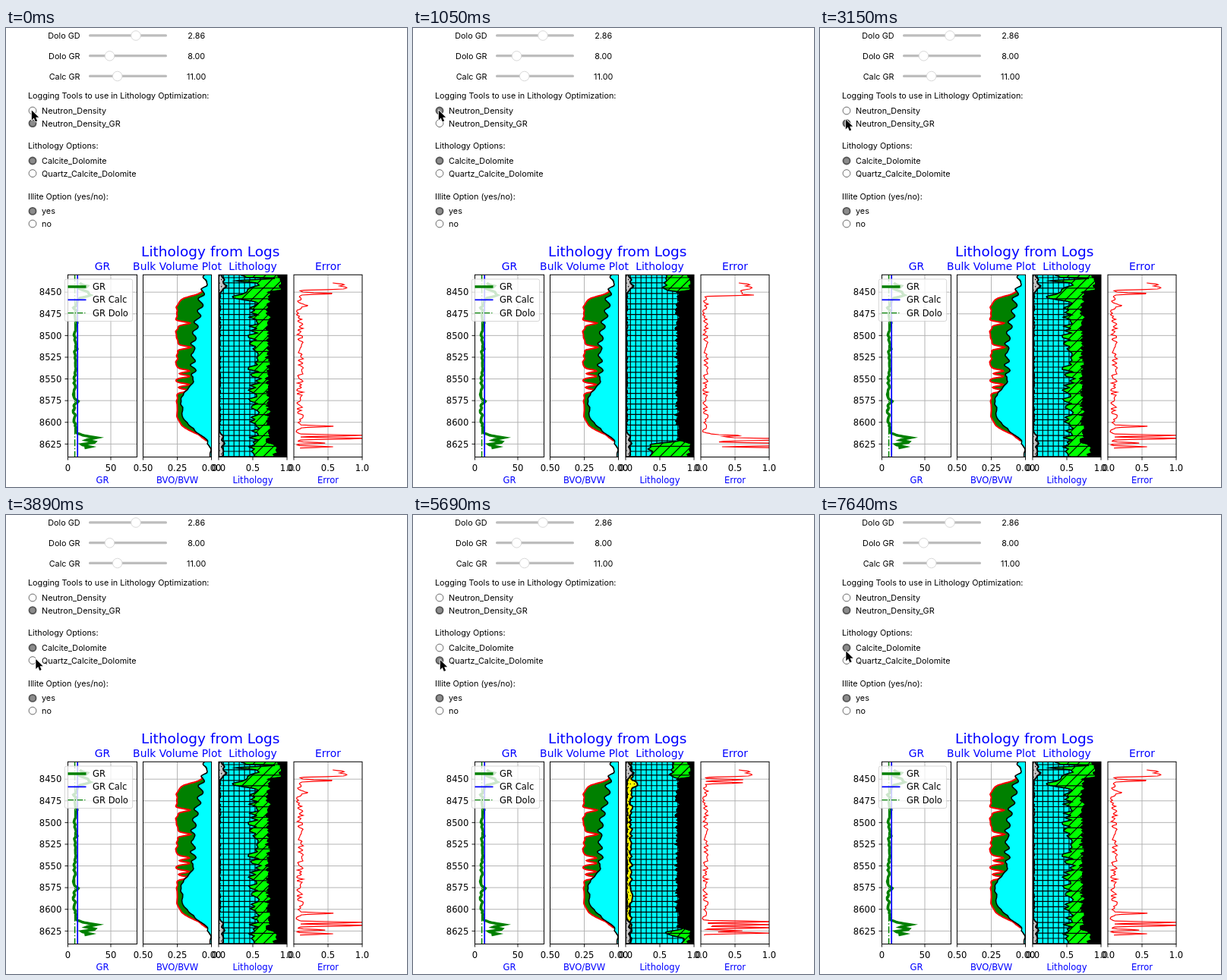
Write an HTML page with a canvas that moves like this. It is 528 px wide and 605 px high and loops after 8000 ms.

```html
<!DOCTYPE html>
<html lang="en">
<head>
<meta charset="utf-8">
<title>Lithology from Logs</title>
<style>
html, body { margin: 0; width: 528px; height: 605px; overflow: hidden; background: #fff; }
canvas { display: block; }
</style>
</head>
<body>
<canvas id="stage" width="528" height="605"></canvas>
<script>
const ctx = document.getElementById('stage').getContext('2d');
const UI = '10.8px Inter, sans-serif';
const plotFont = size => `${size}px "DejaVu Sans", sans-serif`;
const TOP = 325.3, BOTTOM = 565.5, LOOP = 8000;
const PANELS = [[81.5, 172.5], [180.5, 270.5], [280, 370], [379, 469]];
const DEPTHS = Array.from({ length: 8 }, (_, i) => 8450 + 25 * i);
const depthY = d => TOP + (d - 8430) / 210 * (BOTTOM - TOP);

// Each step holds from its time on: [ms, value...]
const CURSOR = [[0, 33, 107], [1650, 34, 111], [1800, 34, 114], [1950, 33, 119], [3450, 33, 121],
  [3600, 39.5, 155], [3740, 39.5, 167], [3890, 38.5, 188.5], [4190, 37, 190], [4640, 35, 189.5],
  [6290, 35, 183], [6440, 33.5, 178]];
const TOOL = [[0, 1], [150, 0], [2400, 1]];
const ROCK = [[0, 0], [4640, 1], [6890, 0]];
const PLOT = [[0, 'gr'], [1050, 'nd'], [3150, 'gr'], [5690, 'quartz'], [7640, 'gr']];
const at = (steps, t) => steps.filter(s => s[0] <= t).pop().slice(1);

// Building blocks for the log curves; all take the screen depth y
const random = (i, seed) => {
  const v = Math.sin(i * 12.9898 + seed * 78.233) * 43758.5453;
  return (v - Math.floor(v)) * 2 - 1;
};
const wobble = (y, seed, size = 2) => {
  const i = Math.floor(y / size), f = y / size - i;
  return random(i, seed) * (1 - f) + random(i + 1, seed) * f;
};
const rise = (y, middle, width) => 1 / (1 + Math.exp((middle - y) / width));
const bump = (y, middle, width) => Math.exp(-(((y - middle) / width) ** 2));
const spike = (y, middle) => Math.max(0, 1 - Math.abs(y - middle) / 1.7);
const sum = (list, f) => list.reduce((total, v) => total + f(v), 0);

const topZone = y => 1 - rise(y, 347, .6);
const endZone = (y, from = 544) => rise(y, from, 1);

function curve(f, from = TOP, to = BOTTOM) {
  const points = [];
  for (let y = from; y <= to; y += .8) points.push([f(y), y]);
  return points;
}

const gamma = y => 90 + 2.4 * wobble(y, 3, 3) + 3 * Math.max(0, Math.sin(y / 5.5)) ** 9
  + 23 * bump(y, 347, 12) * (.75 + .45 * wobble(y, 5, 4)) + endZone(y, 534) * (18 + 12 * wobble(y, 8, 3));

const water = y => Math.min(270, 263 - 6 * rise(y, 346, 2) - 10 * rise(y, 386, 6) - 17 * rise(y, 478, 4)
  + 41 * rise(y, 531, 8) + 2.5 * Math.sin(y / 2.3) * (1 - rise(y, 472, 4)) + 2.5 * wobble(y, 5, 4));

const NOTCHES = [389, 421, 452, 459, 470, 478];
const porosity = y => Math.min(water(y), 225 + 38 * (1 - rise(y, 353, 3)) + 45 * rise(y, 533, 6)
  + sum(NOTCHES, n => 17 * bump(y, n, 2.4)) + 1.7 * wobble(y, 2, 4));

const illite = y => 281.5 + wobble(y, 4)
  + 5 * (topZone(y) + endZone(y, 537)) * (1 + wobble(y, 14, 4));
const quartz = y => 287 + 2.5 * wobble(y, 9, 3) + 10 * bump(y, 354, 5);
const pore = y => 348.5 + 3.5 * wobble(y, 7) + 16 * (topZone(y) + endZone(y));
const lens = y => 9 * (bump(y, 375, 2.5) + bump(y, 412, 2.5));
const plateau = (y, end) => (1 - rise(y, end, .3)) * (53 + 9 * wobble(y, 12));

const MODELS = {
  gr: {
    pore: y => 346 + 4 * wobble(y, 7) + 15 * topZone(y) + 10 * endZone(y, 549),
    dolo: y => 327 + 9 * wobble(y, 6, 3) - 26 * bump(y, 355, 5) + 32 * (1 - rise(y, 334, 1)) * wobble(y, 16, 1.5),
    error: y => 387 + 5 * wobble(y, 11) + plateau(y, 345) + 56 * spike(y, 350) + 14 * spike(y, 366)
      + 48 * spike(y, 525) + 95 * (spike(y, 537) + spike(y, 541)) + 40 * (spike(y, 547) + spike(y, 552))
  },
  nd: {
    pore,
    dolo: y => 355 + 4 * wobble(y, 8, 3) - 24 * topZone(y) - lens(y) - 42 * endZone(y, 546),
    error: y => 385 + 4 * wobble(y, 11) + plateau(y, 351) + 60 * spike(y, 352)
      + endZone(y, 537) * (64 + 55 * wobble(y, 13, 1.5))
  },
  quartz: {
    pore,
    dolo: y => 355 + 4 * wobble(y, 8, 3) - 15 * topZone(y) - lens(y) - 22 * bump(y, 551, 4),
    error: y => 385 + 4 * wobble(y, 11) + plateau(y, 345) + 55 * (spike(y, 349) + spike(y, 353))
      + 95 * sum([536, 540, 544, 551], c => spike(y, c)) + 50 * spike(y, 548)
  }
};

function text(str, x, y, font, color = '#000', align = 'center') {
  ctx.font = font;
  ctx.fillStyle = color;
  ctx.textAlign = align;
  ctx.fillText(str, x, y);
}

function line(points, color, width, dash = []) {
  ctx.beginPath();
  points.forEach(p => ctx.lineTo(...p));
  ctx.strokeStyle = color;
  ctx.lineWidth = width;
  ctx.setLineDash(dash);
  ctx.stroke();
  ctx.setLineDash([]);
}

function clipped(path, draw) {
  ctx.save();
  ctx.beginPath();
  path();
  ctx.clip();
  draw();
  ctx.restore();
}

// Fill between two curves, with an optional hatch and outline
function band(left, right, color, hatch, outline = 1.6) {
  const shape = () => {
    [...curve(left), ...curve(right).reverse()].forEach(p => ctx.lineTo(...p));
    ctx.closePath();
  };
  ctx.beginPath();
  shape();
  ctx.fillStyle = color;
  ctx.fill();
  if (hatch) clipped(shape, hatch);
  if (!outline) return;
  ctx.beginPath();
  shape();
  ctx.lineWidth = outline;
  ctx.strokeStyle = '#000';
  ctx.stroke();
}

const upright = x => [[x, TOP], [x, BOTTOM]];
const level = (y, [x0, x1]) => [[x0, y], [x1, y]];

function bricks() {
  for (let x = 286.3; x < 370; x += 6.94) line(upright(x), '#000', 1.16);
  for (let y = 329; y < BOTTOM; y += 6.94) line(level(y, PANELS[2]), '#000', 1.16);
}

function slashes() {
  for (let y = 332; y < 670; y += 13.9) line([[280, y], [370, y - 90]], '#000', 1.16);
  for (let y = 329; y < BOTTOM; y += 13.9) line(level(y, PANELS[2]), '#000', 1.16);
}

function dots() {
  ctx.fillStyle = '#000';
  for (let i = 0, y = 327; y < BOTTOM; y += 4.6, i++)
    for (let x = 281 + i % 2 * 2.6; x < 302; x += 5.2) {
      ctx.beginPath();
      ctx.arc(x, y, .75, 0, 7);
      ctx.fill();
    }
}

function gammaPanel() {
  line(curve(gamma, 336, 554), '#008000', 3.5);
  line(upright(94.2), '#00f', 1.74);
  line(upright(90.6), '#008000', 1.5, [9, 2.5, 1.5, 2.5]);
}

function volumePanel() {
  band(porosity, water, '#008000', null, 0);
  band(water, () => 270.5, '#0ff', null, 0);
  line(curve(porosity, 345, 545), '#f00', 2);
  line(curve(water), '#000', 1.6);
}

function rockPanel({ pore, dolo }, withQuartz) {
  const left = () => 280, right = () => 370;
  band(left, right, '#0ff', bricks);
  band(y => Math.min(dolo(y), pore(y)), pore, '#0f0', slashes);
  band(pore, right, '#000');
  if (withQuartz) band(illite, y => Math.max(illite(y), quartz(y)), '#ff0', dots, 2);
  band(left, illite, '#c0c0c0', dots, 2);
}

function legend() {
  ctx.beginPath();
  ctx.roundRect(77.3, 331, 89.4, 55.5, 2.5);
  ctx.fillStyle = 'rgba(255,255,255,.8)';
  ctx.fill();
  ctx.lineWidth = 1;
  ctx.strokeStyle = 'rgba(204,204,204,.8)';
  ctx.stroke();
  [['GR', '#008000', 3.5], ['GR Calc', '#00f', 1.74], ['GR Dolo', '#008000', 1.3, [7.4, 1.9, 1.2, 1.9]]]
    .forEach(([name, color, width, dash], i) => {
      const y = 341 + i * 17.3;
      line(level(y, [81.5, 105.5]), color, width, dash);
      text(name, 114, y + 4, plotFont(11.57), '#000', 'left');
    });
}

function plot(name) {
  const model = MODELS[name], blue = '#00f', fractions = ['0.0', '0.5', '1.0'];
  const panels = [
    ['GR', 'GR', ['0', '50'], gammaPanel],
    ['Bulk Volume Plot', 'BVO/BVW', ['0.50', '0.25', '0.00'], volumePanel],
    ['Lithology', 'Lithology', fractions, () => rockPanel(model, name === 'quartz')],
    ['Error', 'Error', fractions, () => line(curve(model.error, 336, 554), '#f00', 1.16)]
  ];
  text('Lithology from Logs', 269.3, 301, plotFont(18.5), blue);
  panels.forEach(([title, label, ticks, draw], i) => {
    const [x0, x1] = PANELS[i], gap = i ? 45 : 56.5, mid = (x0 + x1) / 2;
    const frame = [x0, TOP, x1 - x0, BOTTOM - TOP];
    clipped(() => ctx.rect(...frame), () => {
      line(upright(x0 + gap), '#b0b0b0', .93);
      DEPTHS.forEach(d => line(level(depthY(d), PANELS[i]), '#b0b0b0', .93));
      draw();
    });
    ctx.strokeStyle = '#000';
    ctx.lineWidth = 1;
    ctx.strokeRect(...frame);
    ticks.forEach((tick, k) => {
      const x = x0 + k * gap;
      line([[x, BOTTOM], [x, BOTTOM + 4]], '#000', .93);
      text(tick, x, 583.7, plotFont(11.57));
    });
    text(title, mid, 319, plotFont(13.88), blue);
    text(label, mid, 599.7, plotFont(11.57), blue);
  });
  DEPTHS.forEach(d => {
    line(level(depthY(d), [77.5, 81.5]), '#000', .93);
    text(d, 73.3, depthY(d) + 4.3, plotFont(11.57), '#000', 'right');
  });
  legend();
}

function slider(label, value, y, x) {
  text(label, 97.5, y + 4, UI, '#000', 'right');
  text(value, 250.7, y + 4, UI);
  ctx.fillStyle = '#bdbdbd';
  ctx.beginPath();
  ctx.roundRect(109, y - 2, 103, 3.2, 1.5);
  ctx.fill();
  disc(x, y - .3, 6.3, '#fff', '#d4d4d4', .9);
}

function disc(x, y, r, fill, stroke, width) {
  ctx.beginPath();
  ctx.arc(x, y, r, 0, 7);
  ctx.fillStyle = fill;
  ctx.fill();
  ctx.lineWidth = width;
  ctx.strokeStyle = stroke;
  ctx.stroke();
}

function radios(title, y, options, selected) {
  text(title, 29, y + 4, UI, '#000', 'left');
  options.forEach((name, i) => {
    const cy = y + 19.7 + i * 16.6;
    if (i === selected) disc(35, cy, 4.5, '#8c8c8c', '#565656', 1.9);
    else disc(35, cy, 4.9, '#fff', '#6b6b6b', 1);
    text(name, 47, cy + 4, UI, '#000', 'left');
  });
}

function pointer(x, y) {
  ctx.save();
  ctx.translate(x + .8, y + 1.5);
  ctx.scale(.92, .92);
  ctx.beginPath();
  [[0, 0], [0, 14], [3.2, 11], [5.4, 16.3], [8, 15.2], [5.8, 10.1], [10.2, 10.1]].forEach(p => ctx.lineTo(...p));
  ctx.closePath();
  ctx.lineJoin = 'round';
  ctx.lineWidth = 1.8;
  ctx.strokeStyle = '#fff';
  ctx.stroke();
  ctx.fillStyle = '#000';
  ctx.fill();
  ctx.restore();
}

let shown = '';
function draw(now) {
  const t = now % LOOP;
  const [tool] = at(TOOL, t), [rock] = at(ROCK, t), [name] = at(PLOT, t), tip = at(CURSOR, t);
  const key = [tool, rock, name, tip].join();
  if (key !== shown) {
    shown = key;
    ctx.fillStyle = '#fff';
    ctx.fillRect(0, 0, 528, 605);
    slider('Dolo GD', '2.86', 10.3, 171);
    slider('Dolo GR', '8.00', 37.1, 136.5);
    slider('Calc GR', '11.00', 63.8, 146.7);
    radios('Logging Tools to use in Lithology Optimization:', 89.3, ['Neutron_Density', 'Neutron_Density_GR'], tool);
    radios('Lithology Options:', 155.3, ['Calcite_Dolomite', 'Quartz_Calcite_Dolomite'], rock);
    radios('Illite Option (yes/no):', 221.7, ['yes', 'no'], 0);
    plot(name);
    pointer(...tip);
  }
  requestAnimationFrame(draw);
}
requestAnimationFrame(draw);
</script>
</body>
</html>
```
